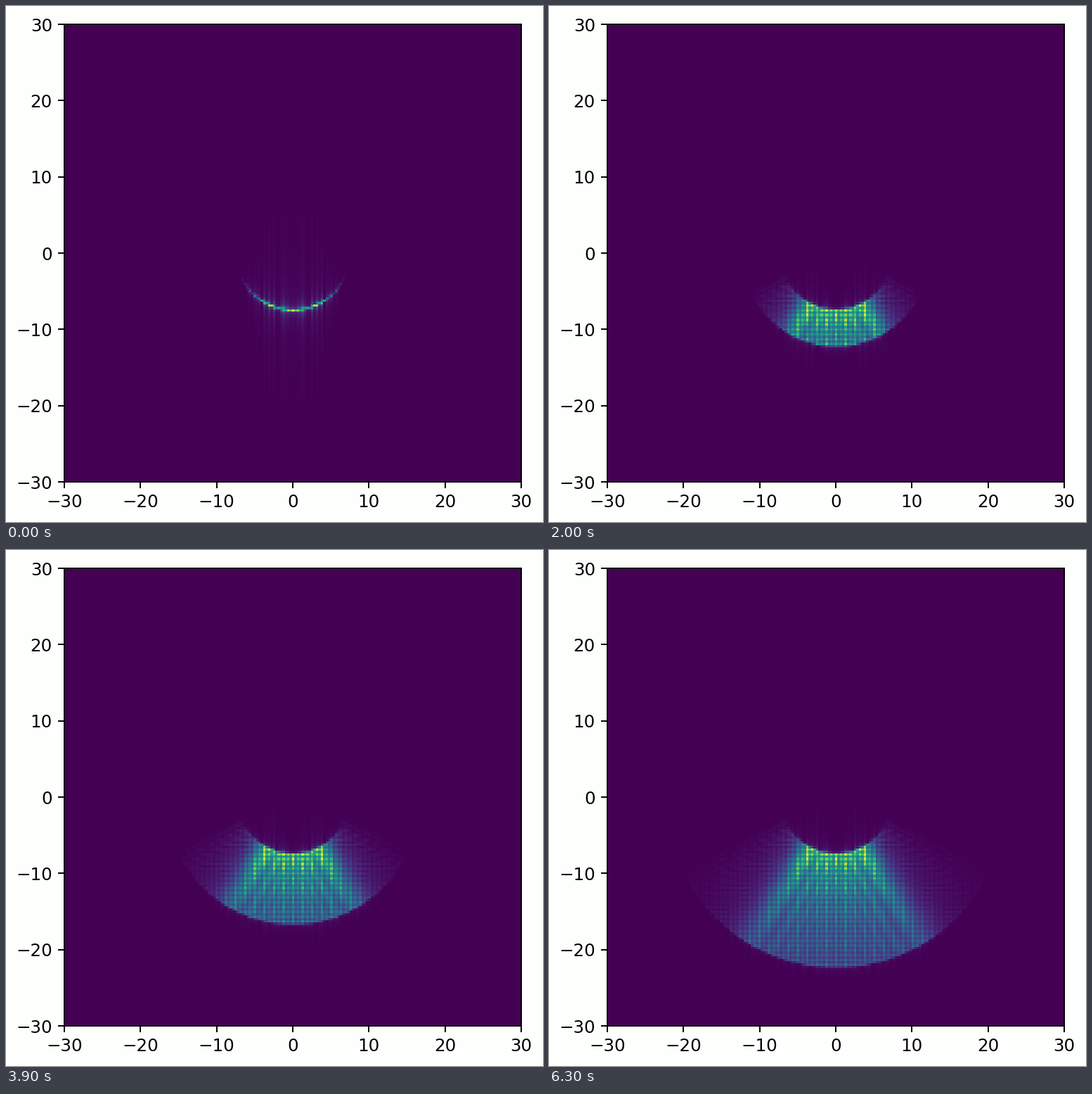
Recreate the animation shown at these times as a matplotlib script. Size 764 by 733 pixels, loop 6400 ms.

```python
import numpy as np
import matplotlib.pyplot as plt
from matplotlib.animation import FuncAnimation

WIDTH, HEIGHT, DPI = 764, 733, 176
STEPS, INTERVAL = 64, 100

SIZE = 20.0               # side of the imaged square
CELLS = 200
DEPTH, HALF = 10.0, 7.5   # target distance, half aperture
DK = 2 * np.pi / SIZE

index = np.arange(CELLS) - CELLS // 2
kx = index * DK
k = 7.5 + 15 * np.arange(STEPS) / STEPS


def aperture_spectrum():
    """Cylindrical wave over the finite aperture, as a function of (kx, k)."""
    x = np.linspace(-HALF, HALF, 301)
    path = np.hypot(x, DEPTH)[:, None]
    wave = np.exp(-1j * k * path) / np.sqrt(k * path)
    return np.exp(1j * kx[:, None] * x) @ wave


def arc_weights():
    """Complex weight and vertical wavenumber of every arc sample."""
    square = k**2 - kx[:, None]**2
    ky = np.sqrt(np.maximum(square, 0))
    t = np.clip((ky / k - 0.35) / 0.25, 0, 1)
    taper = t * t * (3 - 2 * t)
    columns = 1 + 0.18 * np.cos(10 * kx) + 0.12 * np.cos(5 * kx)
    rows = 1 + 0.28 * np.cos(10 * ky)
    weight = aperture_spectrum() * np.exp(1j * ky * DEPTH)
    return weight * taper * columns[:, None] * rows, ky


def build_spectra():
    """Running sum of the arcs, each leaking along its column."""
    weight, ky = arc_weights()
    total = np.zeros((CELLS, CELLS), complex)
    spectra = []
    for j in range(STEPS):
        total += weight[:, j] * np.sinc(index[:, None] + ky[:, j] / DK)
        level = np.abs(total)
        spectra.append(level / level.max())
    return spectra


spectra = build_spectra()

fig = plt.figure(figsize=((WIDTH + 1e-6) / DPI, (HEIGHT + 1e-6) / DPI),
                 dpi=DPI, facecolor="#fdfffd")
ax = fig.add_axes([83 / WIDTH, 57 / HEIGHT, 650 / WIDTH, 650 / HEIGHT])
low, high = (index[0] - 0.5) * DK, (index[-1] + 0.5) * DK
image = ax.imshow(spectra[0], origin="lower", extent=(low, high, low, high),
                  cmap="viridis", vmin=0, vmax=1, interpolation="nearest")
ax.set(xlim=(-30, 30), ylim=(-30, 30),
       xticks=range(-30, 31, 10), yticks=range(-30, 31, 10))


def update(i):
    image.set_data(spectra[i])
    return [image]


anim = FuncAnimation(fig, update, frames=STEPS, interval=INTERVAL,
                     repeat=True, repeat_delay=0)
plt.show()
```
